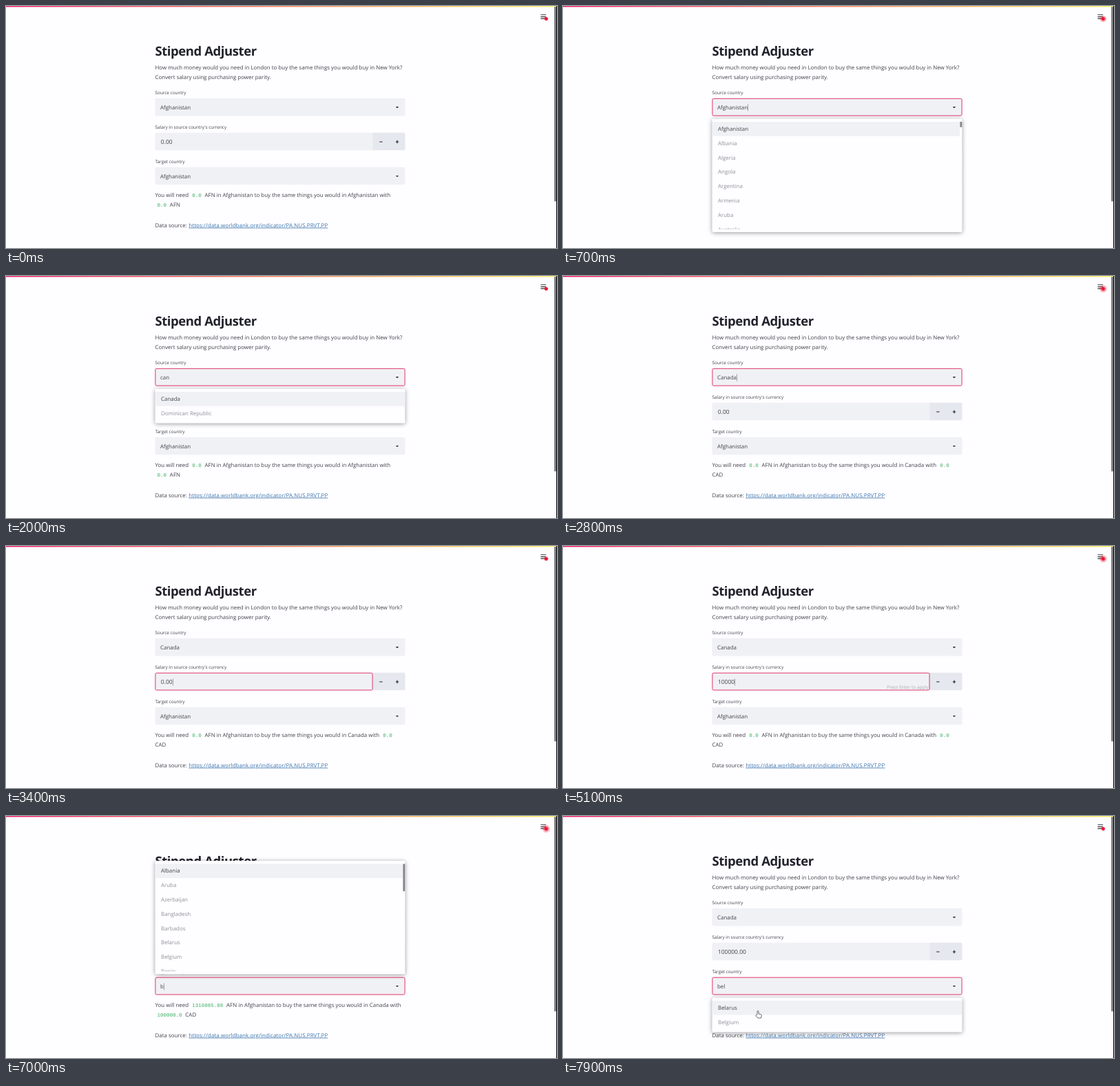
An HTML page that plays this animation: 800 by 351 pixels, repeating every 8000 ms.

```html
<!DOCTYPE html>
<html lang="en">
<head>
<meta charset="utf-8">
<title>Stipend Adjuster</title>
<style>
  html, body { margin: 0; width: 100%; height: 100%; overflow: hidden; background: #fefdff; }
  svg { display: block; width: 800px; height: 351px; }
  text { font: 7.93px "Open Sans", "Noto Sans", sans-serif; fill: #41424b; white-space: pre; text-rendering: geometricPrecision; }
  .title { font-size: 18.5px; font-weight: 700; letter-spacing: -.43px; fill: #22232c; }
  .label { font-size: 6.42px; }
  .amount { font-size: 8.5px; }
  .hint { font-size: 6.5px; fill: #a9abb4; text-anchor: end; }
  .item { fill: #909098; }
  .link { fill: #3b74ad; letter-spacing: .09px; text-decoration: underline .8px; text-underline-offset: 1.3px; }
  .code { font: 7.5px "Liberation Mono", "DejaVu Sans Mono", monospace; fill: #3bb062; }
  .caret { font-size: 10px; font-weight: 300; }
  .panel { fill: #fefdff; filter: drop-shadow(0 1.2px 3px #0006); }
</style>
</head>
<body>
<svg id="stage" viewBox="0 0 800 351"></svg>
<script>
const LOOP = 8000, ROW = 20.8, LEFT = 216.5, RIGHT = 579.5;
const PINK = '#e0356a', FIELD = '#f0f1f5';
const countries = ('Afghanistan,Albania,Algeria,Angola,Argentina,Armenia,Aruba,Australia,Austria,Azerbaijan,' +
  'Bangladesh,Barbados,Belarus,Belgium,Benin,Bermuda,Bhutan,Bolivia,Cabo Verde,Cambodia,Cameroon,Canada,' +
  'Chad,Chile,China,Colombia,Costa Rica,Dominica,Dominican Republic,Gabon,Liberia,Luxembourg,Uzbekistan').split(',');

// [start time, text]
const sourceKeys = [[0, 'Afghanistan'], [400, 'Afghanistan'], [1100, 'c'], [1300, 'ca'], [1450, 'can'], [2400, 'Canada']];
const amountKeys = [[0, '0.00'], [3000, '0.00'], [3800, '0.0'], [3900, '0.'], [4000, '0'], [4100, ''], [4400, '1'],
  [4600, '10'], [4750, '100'], [4900, '1000'], [5050, '10000'], [5300, '100000'], [5600, '100000.00']];
const targetKeys = [[0, 'Afghanistan'], [6500, 'Afghanistan'], [6800, 'b'], [7200, 'be'], [7350, 'bel']];

const within = (t, a, b) => t >= a && t < b;
const latest = (keys, t) => keys.filter(k => k[0] <= t).pop();
const text = (x, y, s, cls = '') => `<text x="${x}" y="${y}" class="${cls}">${s}</text>`;
const rect = (x, y, w, h, fill, extra = '') => `<rect x="${x}" y="${y}" width="${w}" height="${h}" fill="${fill}" ${extra}/>`;
const line = (d, color, w) => `<path d="${d}" stroke="${color}" stroke-width="${w}" fill="none"/>`;
const code = (s, dx = 3) => `<tspan class="code" dx="${dx}">${s}</tspan>`;
const after = s => `<tspan dx="2.8"> ${s}</tspan>`;

function box(y, right, focused) {
  return focused
    ? rect(LEFT + .4, y + .5, right - LEFT - .8, 24.8, FIELD, `rx="1.8" stroke="${PINK}"`)
    : rect(LEFT, y, right - LEFT, 25.6, FIELD, 'rx="2"');
}

function typed(x, y, [start, value], focused, t, cls) {
  const caret = focused && (t - start) % 1000 < 500 ? '<tspan class="caret" dx="-2" dy=".6">|</tspan>' : '';
  return text(x, y, value + caret, cls);
}

function select(y, key, focused, t) {
  return box(y, RIGHT, focused) + typed(224, y + 16, key, focused, t) +
    `<path d="M565.8 ${y + 12.2}h4.4l-2.2 2.2z" fill="#22232c"/>`;
}

function amount(t) {
  const y = 183.7, focused = within(t, 3000, 6000);
  return rect(530, y, RIGHT - 530, 25.6, '#e5e8ee', 'rx="2"') + box(y, 532.5, focused) +
    typed(224.8, 199.7, latest(amountKeys, t), focused, t, 'amount') +
    line('M542.2 197h4.4M565.8 197h4.4M568 194.8v4.4', '#22232c', 1.2) +
    (within(t, 3800, 5600) ? text(530.5, 206.6, 'Press Enter to apply', 'hint') : '');
}

function list(fieldY, [start, query], t) {
  const all = query === 'Afghanistan';
  const items = all ? countries : countries.filter(c => c.toLowerCase().includes(query));
  const long = items.length > 7;
  const inner = long ? 156 : items.length * ROW;
  const top = fieldY > 200 && items.length > 3 ? fieldY - 4.3 - inner - 8.4 : fieldY + 29.8;
  const y = top + 4.2, width = RIGHT - LEFT;
  const thumb = all ? 8 : Math.min(40, inner * inner / (items.length * ROW));
  const rows = items.slice(0, 8).map((c, i) =>
    text(225, y + i * ROW + 13.2, c, i ? 'item' : '')).join('');
  const fade = all ? Math.min(1, (t - start) / 200) : 1;
  return `<g opacity="${fade.toFixed(2)}">` + rect(LEFT, top, width, inner + 8.4, '#fefdff', 'rx="2" class="panel"') +
    `<clipPath id="rows">${rect(LEFT, y, width, inner, '#000')}</clipPath><g clip-path="url(#rows)">` +
    rect(LEFT, y, width - (long ? 3.5 : 0), ROW, FIELD) + rows +
    (long ? rect(576.4, y, 3.2, thumb, '#85858a', 'rx=".8"') : '') + '</g></g>';
}

function result(t) {
  const paid = t >= 6400, moved = t >= 2400;
  const value = paid ? '1316085.88' : '0.0';
  const place = moved ? 'Canada' : 'Afghanistan';
  const first = 'You will need ' + code(value) +
    after(`AFN in Afghanistan to buy the same things you would in ${place} with`);
  const tail = moved && !paid;
  return text(LEFT, 277.2, first + (tail ? ' ' + code('0.0') : '')) +
    text(LEFT, 290.6, tail ? 'CAD' : code(paid ? '100000.0' : '0.0') + after(paid ? 'CAD' : 'AFN'));
}

function menu(t) {
  const glow = Math.max(0, Math.cos((t - 950) / 1000 * Math.PI));
  return line('M776.3 12.8h7.8M776.3 15.6h7.8M776.3 18.4h7.8', '#3a3a42', 1.1) +
    `<circle cx="784.3" cy="18.6" r="${(3.6 + 2.8 * glow).toFixed(2)}" fill="url(#halo)"/>` +
    '<circle cx="784.3" cy="18.6" r="2.4" fill="#ee1230"/>';
}

function pointer(t) {
  if (t < 7650) return '';
  const p = 1 - (1 - Math.min(1, (t - 7650) / 200)) ** 2;
  return `<path transform="translate(${279.5 + 8 * (1 - p)} ${282 + 42 * (1 - p)})" fill="#fff" stroke="#44454c" stroke-width=".8"
    d="M2.5 6V1.2q1-1.4 2 0V5l3.4.8q1 .4.8 1.6l-.7 3.6H3.4L.3 7.4q.3-1 1.2-.6z"/>`;
}

const fixed = `<defs>
  <linearGradient id="bar"><stop stop-color="#ee1c68"/><stop offset=".5" stop-color="#f8885f"/><stop offset="1" stop-color="#fbf36a"/></linearGradient>
  <radialGradient id="halo"><stop offset=".25" stop-color="#f0203c" stop-opacity=".75"/><stop offset="1" stop-color="#f0203c" stop-opacity="0"/></radialGradient>
  </defs>` +
  rect(0, 0, 800, 351, '#fefdff') + rect(0, 0, 800, 1.4, 'url(#bar)') +
  rect(799, 0, 1, 351, '#000') + rect(796, 1, 3, 282.5, '#7d7d81', 'rx="1"') +
  text(LEFT, 72, 'Stipend Adjuster', 'title') +
  text(LEFT, 92.4, 'How much money would you need in London to buy the same things you would buy in New York?') +
  text(LEFT, 105.8, 'Convert salary using purchasing power parity.') +
  text(LEFT, 127.5, 'Source country', 'label') +
  text(LEFT, 177.5, "Salary in source country's currency", 'label') +
  text(LEFT, 227.5, 'Target country', 'label') +
  text(LEFT, 320.6, 'Data source:') +
  text(265.3, 320.6, 'https://data.worldbank.org/indicator/PA.NUS.PRVT.PP', 'link');

function scene(t) {
  const source = latest(sourceKeys, t), target = latest(targetKeys, t);
  return fixed + menu(t) +
    select(133.8, source, within(t, 400, 3000), t) + amount(t) +
    select(233.7, target, t >= 6500, t) + result(t) +
    (within(t, 400, 2400) ? list(133.8, source, t) : '') +
    (t >= 6500 ? list(233.7, target, t) : '') + pointer(t);
}

const stage = document.getElementById('stage');
const begin = performance.now();
function draw() {
  stage.innerHTML = scene((performance.now() - begin) % LOOP);
  requestAnimationFrame(draw);
}
draw();
</script>
</body>
</html>
```
